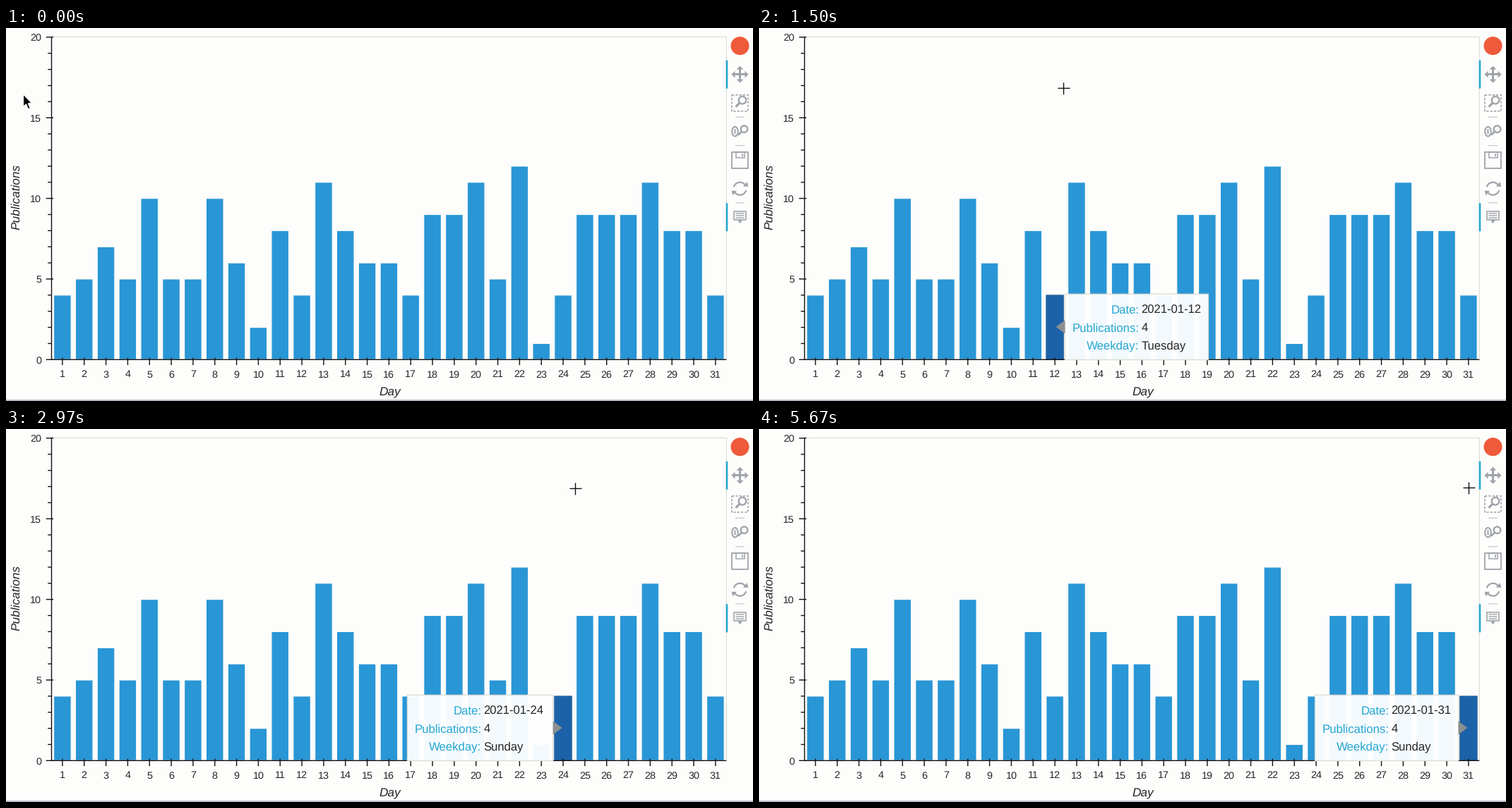
Animation, 1058 px wide and 529 px high, one loop 5.71 s. Source, as a matplotlib script:

```python
import numpy as np
import matplotlib.pyplot as plt
from matplotlib.animation import FuncAnimation
from matplotlib.collections import LineCollection, PatchCollection
from matplotlib.patches import Arc, Circle, Ellipse, Polygon, Rectangle

W, H, DPI = 1058, 529, 100
LOOP, STEP = 5710, 10
PX = 0.72  # points per pixel

VALUES = [4, 5, 7, 5, 10, 5, 5, 10, 6, 2, 8, 4, 11, 8, 6, 6,
          4, 9, 9, 11, 5, 12, 1, 4, 9, 9, 9, 11, 8, 8, 4]
DAYS = range(1, len(VALUES) + 1)
WEEKDAYS = ["Friday", "Saturday", "Sunday", "Monday",
            "Tuesday", "Wednesday", "Thursday"]

LEFT, RIGHT, TOP, BASE = 64.5, 1020.3, 13, 470.3
SLOT = (RIGHT - LEFT) / len(VALUES)
UNIT = (BASE - TOP) / 20
BAR = 0.8 * SLOT
PAPER, INK, ICON, CYAN = "#fdfdfb", "#262626", "#9fa3aa", "#26a7d3"

plt.rcParams["font.family"] = "Liberation Sans"
plt.rcParams["text.hinting"] = "none"

fig = plt.figure(figsize=(W / DPI, H / DPI), dpi=DPI, facecolor=PAPER)
ax = fig.add_axes([0, 0, 1, 1])
ax.set_xlim(0, W)
ax.set_ylim(H, 0)
ax.axis("off")


def center(day):
    return LEFT + SLOT * (day - 0.5)


def y_of(value):
    return BASE - UNIT * value


def lines(segments, color, width, z=2):
    ax.add_collection(LineCollection(segments, colors=color, zorder=z,
                                     linewidths=width * PX, capstyle="butt",
                                     snap=False))


def text(x, y, s, size, color=INK, z=3, **kw):
    return ax.text(x, y, s, fontsize=size * PX, color=color, zorder=z,
                   va="baseline", **kw)


def outline(patch, width=2, **kw):
    patch.set(fill=False, edgecolor=ICON, linewidth=width * PX, **kw)
    ax.add_patch(patch)


def solid(points, color=ICON, **kw):
    return ax.add_patch(Polygon(points, fc=color, **kw))


def turned(points, degrees, origin):
    c, s = np.cos(np.radians(degrees)), np.sin(np.radians(degrees))
    return np.array(points) @ [[c, s], [-s, c]] + origin


def magnifier(x, y, r, reach, width):
    outline(Circle((x, y), r), 2.3)
    lines([[(x - 0.7 * r, y + 0.7 * r), (x - reach, y + reach)]], ICON, width)


def draw_chart():
    lines([[(LEFT, TOP - 0.5), (RIGHT, TOP - 0.5)],
           [(RIGHT, TOP - 0.5), (RIGHT, BASE)]], "#dddfd5", 1.2, 0.5)
    lines([[(0, 528), (W, 528)]], "#a5a4b8", 1.5)

    bars = [Rectangle((center(d) - BAR / 2, y_of(v)), BAR, BASE - y_of(v))
            for d, v in zip(DAYS, VALUES)]
    ax.add_collection(PatchCollection(bars, facecolor="#2996d6",
                                      edgecolor=PAPER, linewidth=1.2 * PX,
                                      zorder=1, snap=False))

    ticks = [[(LEFT, TOP - 0.6), (LEFT, BASE + 0.6)],
             [(LEFT, BASE), (RIGHT, BASE)]]
    for v in range(21):
        y = y_of(v)
        major = v % 5 == 0
        out, into = (7.8, 2.6) if major else (5.2, 0)
        ticks.append([(LEFT - out, y), (LEFT + into, y)])
        if major:
            text(50, y + 5.2, str(v), 14.4, ha="right")
    for d in DAYS:
        ticks.append([(center(d), BASE - 2.6), (center(d), BASE + 7.8)])
        text(center(d), 495.4, str(d), 14.4, ha="center")
    lines(ticks, "#111111", 1.4)

    text(543.5, 521.5, "Day", 17.2, ha="center", style="italic")
    text(19, 240, "Publications", 17.2, ha="center", style="italic",
         rotation=90, rotation_mode="anchor")


def draw_toolbar():
    x = 1039.5
    logo, pan, box, wheel, save, reset, hover = 25.3 + 40.5 * np.arange(7)

    ax.add_patch(Circle((x, logo), 13, fc="#ee5a3a"))
    lines([[(1021, y - 20), (1021, y + 20)] for y in (pan, hover)], CYAN, 2.6)
    lines([[(x - 6.5, y - 20.5), (x + 6.5, y - 20.5)]
           for y in (wheel, save, hover)], "#c9cacc", 1.3)

    for quarter in range(4):
        for shape in ([(0, -1.5), (8, -1.5), (8, 1.5), (0, 1.5)],
                      [(12, 0), (7, 5), (7, -5)]):
            solid(turned(shape, 90 * quarter, (x, pan)))

    outline(Rectangle((x - 11.5, box - 11.5), 23, 23), 1.6, ls=(0, (2, 1.3)))
    magnifier(x + 3.5, box - 4, 5.3, 9.5, 3.2)

    outline(Ellipse((x - 7, wheel), 8.5, 13.5))
    lines([[(x - 7, wheel - 3.5), (x - 7, wheel + 3.5)]], ICON, 2)
    magnifier(x + 6, wheel - 3.5, 4.8, 8.5, 2.6)

    outline(Rectangle((x - 11.5, save - 11), 23, 22.5), 1.8)
    outline(Rectangle((x - 6, save - 11), 12.5, 8), 1.5)
    lines([[(x + 3.5, save - 9), (x + 3.5, save - 5)]], ICON, 1.8)

    for half in (0, 180):
        outline(Arc((x, reset), 18, 18, theta1=195 + half,
                    theta2=330 + half), 2.2)
        solid(turned([(4.5, -3), (12, -3), (10, -9.5)], half, (x, reset)))

    outline(Rectangle((x - 8.5, hover - 8.5), 17, 12.5), 1.6)
    solid([(x - 3.5, hover + 4), (x + 3.5, hover + 4), (x, hover + 9)])
    lines([[(x - 6, hover + dy), (x + 6, hover + dy)]
           for dy in (-5.4, -2.2, 1)], ICON, 1.4)


draw_chart()
draw_toolbar()

hover_bar = ax.add_patch(Rectangle((0, 0), BAR, 1, fc="#1b62a9", ec="#3d6c9c",
                                   lw=PX, zorder=1.5, snap=False))

tip_box = ax.add_patch(Rectangle((0, 0), 1, 93.3, fc=(1, 1, 1, 0.95),
                                 ec="#d8dad2", lw=1.2 * PX, zorder=5,
                                 snap=False))
tip_arrow = solid([(0, 0)] * 3, "#8c8f90", zorder=6)
tip_labels = [text(0, 0, s, 16.7, CYAN, 6, ha="right")
              for s in ("Date:", "Publications:", "Weekday:")]
tip_values = [text(0, 0, "", 16.6, z=6) for _ in range(3)]
tip_parts = [tip_box, tip_arrow, *tip_labels, *tip_values]

ARROW = np.array([(0, 0), (0, 17.5), (4, 14), (7, 21), (9.8, 19.8),
                  (6.8, 13), (12, 12.6)])
arrow = solid(ARROW, "black", ec="white", lw=1.2 * PX, zorder=10)
cross, = ax.plot([0], [0], "+", color="#111111", ms=17 * PX, mew=1.4 * PX,
                 zorder=10)

# smooth sweep through a few (seconds, x) points, stopping at the last bar
SWEEP = np.array([(0, 24.5), (1.07, 293), (1.87, 540),
                  (2.97, 806), (3.47, 906), (4.56, 1005)])
CURVE = np.polyfit(*SWEEP.T, len(SWEEP) - 1)
STOP, X_END = SWEEP[-1]
TIP_LAG, HOVER_LAG = 0.035, 0.052


def pointer_x(t):
    if t >= STOP:
        return X_END
    return min(np.polyval(CURVE, max(t, 0)), X_END)


def pointer_y(t):
    return 86 - 0.6 * min(t, STOP) + 8 * np.exp(-t / 0.15)


def bar_under(x):
    day = int((x - LEFT) // SLOT) + 1
    if day in DAYS and abs(x - center(day)) <= BAR / 2:
        return day
    return None


def show_tip(day):
    for part in tip_parts:
        part.set_visible(day is not None)
    if day is None:
        return
    value = VALUES[day - 1]
    rows = (f"2021-01-{day:02d}", str(value), WEEKDAYS[(day - 1) % 7])
    c, mid = center(day), y_of(value / 2) - 0.7
    width = 213 - 3.3 * rows[0].count("1")  # narrow ones shrink the box
    side = 1 if c < (LEFT + RIGHT) / 2 - 1 else -1
    edge = c + 14.3 * side
    left = edge if side > 0 else edge - width
    tip_box.set(x=left, y=mid - 46.6, width=width)
    tip_arrow.set_xy([(c + 1.5 * side, mid), (edge, mid - 9.5),
                      (edge, mid + 9.5)])
    for i, row in enumerate(rows):
        y = mid + 25.3 * (i - 1) + 6.5
        tip_labels[i].set_position((left + 105, y))
        tip_values[i].set_position((left + 108, y))
        tip_values[i].set_text(row)


def show_hover(day):
    hover_bar.set_visible(day is not None)
    if day is not None:
        top = y_of(VALUES[day - 1])
        hover_bar.set(x=center(day) - BAR / 2, y=top, height=BASE - top)


def update(i):
    # 30 pictures a second, rounded to 10 ms ticks
    t = round((3 * i + 1) // 10 / 30, 2)
    x, y = pointer_x(t), pointer_y(t)
    inside = x > LEFT
    arrow.set_visible(not inside)
    cross.set_visible(inside)
    arrow.set_xy(ARROW + (x, y))
    cross.set_data([x], [y])
    show_tip(bar_under(pointer_x(t - TIP_LAG)))
    show_hover(bar_under(pointer_x(t - HOVER_LAG)))
    return [arrow, cross, hover_bar, *tip_parts]


anim = FuncAnimation(fig, update, frames=LOOP // STEP, interval=STEP,
                     repeat=True, repeat_delay=0, blit=False)
plt.show()
```
